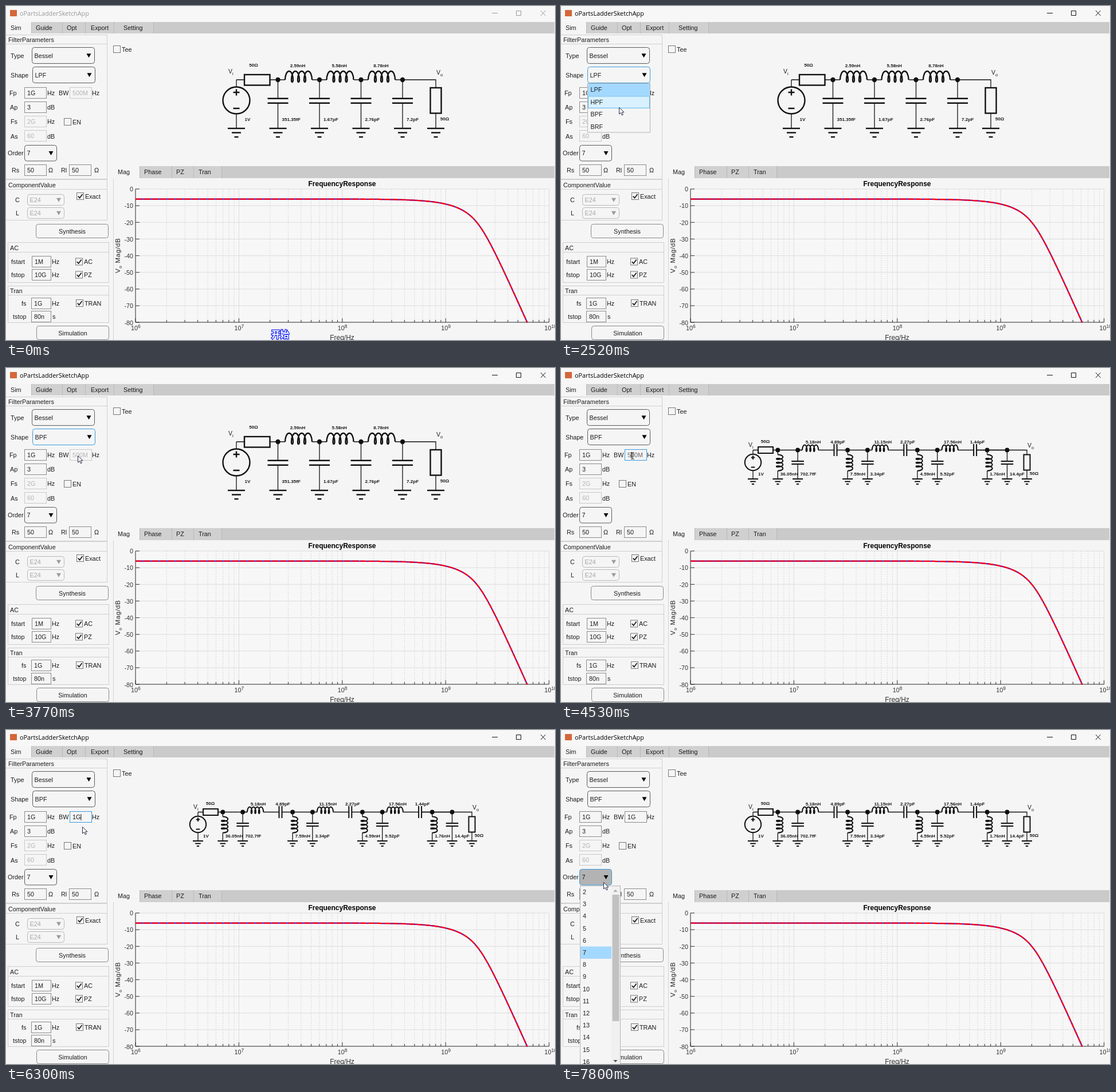
An HTML page that plays this animation: 958 px wide and 584 px high, repeating every 8 s.

```html
<!DOCTYPE html>
<html lang="en">
<head>
<meta charset="utf-8">
<title>Filter designer</title>
<style>
html, body { margin: 0; width: 100%; height: 100%; overflow: hidden; background: #f5f5f5; }
svg { display: block; width: 958px; height: 584px; }
text { font-family: "Liberation Sans", Arial, sans-serif; font-size: 10.8px; fill: #1c1c1c; white-space: pre; }
</style>
</head>
<body>
<svg id="stage" viewBox="0 0 958 584"></svg>
<script>
const LOOP = 8000;
const BG = '#f5f5f5', INK = '#1c1c1c', OFF = '#b4b4b4', BLUE = '#3a9bdc', PICK = '#a4d9ff';
const stage = document.getElementById('stage');

function el(parent, tag, attrs = {}, content) {
  const e = document.createElementNS('http://www.w3.org/2000/svg', tag);
  set(e, attrs);
  if (content !== undefined) e.textContent = content;
  parent.appendChild(e);
  return e;
}
function set(e, attrs) { for (const k in attrs) e.setAttribute(k, attrs[k]); }
function show(e, on) { e.setAttribute('visibility', on ? 'visible' : 'hidden'); }

const group = (parent = stage) => el(parent, 'g');
const label = (p, x, y, s, a = {}) => el(p, 'text', { x, y, ...a }, s);
const box = (p, x1, y1, x2, y2, a = {}) =>
  el(p, 'rect', { x: x1, y: y1, width: x2 - x1, height: y2 - y1, fill: 'none', ...a });
const path = (p, d, a = {}) => el(p, 'path', { d, fill: 'none', stroke: '#111', ...a });
const sub = (p, x, y, base, low, size) => {
  const t = label(p, x, y, base, { 'font-size': size, style: `font-size:${size}px` });
  el(t, 'tspan', { dy: 3, style: `font-size:${size * 0.72}px` }, low);
  return t;
};

// Widgets
function tabs(p, x, y, w, h, edges, names, xs) {
  box(p, x, y, x + w, y + h, { fill: '#cacaca' });
  box(p, x, y, edges[edges.length - 1], y + h, { fill: '#d0d0d0' });
  box(p, x, y, edges[0], y + h + 1, { fill: BG });
  edges.forEach(e => path(p, `M${e + .5} ${y}v${h}`, { stroke: '#b9b9b9' }));
  names.forEach((n, i) => label(p, xs[i], y + 14, n));
}
function field(p, x1, y1, x2, y2, s, off) {
  const r = box(p, x1 - .5, y1 - .5, x2 + .5, y2 + .5, { fill: BG, stroke: off ? '#c9c9c9' : '#8c8c8c' });
  const t = label(p, x1 + 4, (y1 + y2) / 2 + 4, s, { style: `fill:${off ? OFF : INK}` });
  return { r, t };
}
function combo(p, x1, y1, x2, y2, s, off) {
  const my = (y1 + y2) / 2, ax = x2 - (off ? 10 : 10.5);
  const r = box(p, x1 + .5, y1 + .5, x2 - .5, y2 - .5, { rx: 4, fill: BG, stroke: off ? '#b9b9b9' : '#5c5c5c' });
  const t = label(p, x1 + 4.5, my + 4, s, { style: `fill:${off ? '#a6a6a6' : INK}` });
  path(p, `M${ax - 4} ${my - 3.2}h8l-4 7z`, { fill: off ? '#9b9b9b' : '#000', stroke: 'none' });
  return { r, t };
}
function check(p, x, y, s, on) {
  box(p, x + .5, y + .5, x + 12.5, y + 12.5, { fill: BG, stroke: '#777' });
  if (on) path(p, `M${x + 2.8} ${y + 6.6}l2.8 3l5 -6.6`, { stroke: '#222', 'stroke-width': 1.8 });
  label(p, x + 15, y + 10.5, s);
}
function button(p, x1, y1, x2, y2, s) {
  box(p, x1 - .5, y1 - .5, x2 + .5, y2 + .5, { rx: 4, fill: BG, stroke: '#8a8a8a' });
  label(p, (x1 + x2) / 2, (y1 + y2) / 2 + 4, s, { 'text-anchor': 'middle' });
}
function panel(p, x1, y1, x2, y2, lineY, s) {
  box(p, x1 + .5, y1 + .5, x2 - .5, y2 - .5, { stroke: '#cfcfcf' });
  path(p, `M${x1} ${lineY + .5}H${x2}`, { stroke: '#cfcfcf' });
  label(p, Math.max(4, x1 + 4), lineY - 4 + .5, s);
}

// Title bar
const bar = group();
box(stage, 0, 0, 958, 28, { fill: '#f7f7f7' });
const title = label(stage, 24, 16.8, 'oPartsLadderSketchApp', {});
box(stage, 7, 7, 19, 18, { fill: '#d5673a' });
const winBtns = path(stage, 'M848 12.5h10M890.5 8.5h8v8h-8zM933 8l8.5 9M941.5 8l-8.5 9');
tabs(stage, 0, 28, 957, 20, [44, 98, 138, 188, 257],
  ['Sim', 'Guide', 'Opt', 'Export', 'Setting'], [8, 52, 106, 148, 205]);

// Left column
const side = group();
panel(side, -2, 50, 177, 303, 66, 'FilterParameters');
panel(side, -2, 303, 177, 375, 320, 'ComponentValue');
panel(side, 3, 413, 180, 484, 430, 'AC');
panel(side, 3, 489, 180, 554, 505, 'Tran');
[['Type', 8, 91], ['Shape', 8, 125], ['Fp', 6, 156], ['Hz', 72, 156], ['BW', 92, 156], ['Hz', 150, 156],
 ['Ap', 7, 181], ['dB', 72, 181], ['Fs', 8, 206], ['Hz', 72, 206], ['As', 8, 232], ['dB', 72, 232],
 ['Order', 3, 261], ['Rs', 10, 291], ['Ω', 74, 291], ['Rl', 96, 291], ['Ω', 154, 291],
 ['C', 16, 343], ['L', 17, 366], ['fstart', 9, 451], ['Hz', 80, 451], ['fstop', 9, 474], ['Hz', 80, 474],
 ['fs', 27, 524], ['Hz', 80, 524], ['tstop', 12, 547], ['s', 81, 547]
].forEach(([s, x, y]) => label(side, x, y, s));
combo(side, 45, 72, 155, 101, 'Bessel');
const shape = combo(side, 46, 106, 156, 135, 'LPF');
const order = combo(side, 32, 243, 89, 271.5, '7');
combo(side, 37, 329, 102, 349, 'E24', true);
combo(side, 37, 352, 102, 372, 'E24', true);
field(side, 33, 143, 70, 161, '1G');
const bw = field(side, 112, 143, 149, 161, '500M');
field(side, 33, 168, 70, 186, '3');
field(side, 33, 193, 70, 211, '2G', true);
field(side, 33, 218, 70, 236, '60', true);
field(side, 33, 278, 70, 296, '50');
field(side, 111, 278, 148, 296, '50');
field(side, 46, 438, 78, 456, '1M');
field(side, 46, 461, 78, 479, '10G');
field(side, 45, 511, 78, 529, '1G');
field(side, 45, 534, 78, 552, '80n');
const mark = box(side, 116, 145, 144, 159, { fill: PICK, 'fill-opacity': .6 });
const caret = path(side, 'M0 147v11', { stroke: '#111' });
check(side, 101, 196, 'EN');
check(side, 187, 69, 'Tee');
check(side, 123, 326, 'Exact', true);
check(side, 121, 440.5, 'AC', true);
check(side, 121, 463.5, 'PZ', true);
check(side, 122, 513, 'TRAN', true);
button(side, 53, 382, 178, 405, 'Synthesis');
button(side, 54, 560, 179, 583, 'Simulation');

// Schematics: every part is drawn at scale k
function schematic(k, y) {
  const g = group(), thick = { 'stroke-width': k < 1 ? 2 : 2.4 };
  const gy = k < 1 ? 194 : 214;
  const wire = d => path(g, d, { 'stroke-width': 1.3 });
  const coilPath = `M0 0${Array(4).fill('a7 15 0 0 1 14 0').join('a1.5 4 0 0 1 -3 0')}`;
  const part = {
    wire,
    text: (x, ty, s, anchor = 'middle') =>
      label(g, x, ty, s, { 'text-anchor': anchor, style: 'font-size:8.1px;font-weight:bold' }),
    dot: x => el(g, 'circle', { cx: x, cy: y, r: k < 1 ? 3.9 : 4.2, fill: '#111' }),
    coil: (x, cy, turn = 0) => path(g, coilPath,
      { transform: `translate(${x} ${cy}) rotate(${turn}) scale(${k})`, 'stroke-width': (k < 1 ? 2 : 2.4) / k }),
    ground: x => [15, 8, 3.5].forEach((w, i) =>
      path(g, `M${x - w * k} ${gy + i * 7.5 * k}h${2 * w * k}`, thick)),
    rect: (x1, y1, x2, y2) => box(g, x1, y1, x2, y2, { stroke: '#111', ...thick }),
    shuntC(x) {
      const cy = k < 1 ? 165.5 : 165.8, d = 4 * k;
      wire(`M${x} ${y}V${cy - d}M${x} ${cy + d}V${gy}`);
      path(g, `M${x - 18 * k} ${cy - d}h${36 * k}M${x - 18 * k} ${cy + d}h${36 * k}`, thick);
      part.ground(x);
    },
    source(x, cy, r) {
      wire(`M${x} ${y}V${cy - r}M${x} ${cy + r}V${gy}`);
      el(g, 'circle', { cx: x, cy, r, fill: 'none', stroke: '#111', ...thick });
      const h = 5.5 * k, m = 14 * k;
      path(g, `M${x - h} ${cy - m}h${2 * h}M${x} ${cy - m - h}v${2 * h}M${x - h} ${cy + m}h${2 * h}`, thick);
      part.ground(x);
    }
  };
  return { g, ...part };
}

const low = schematic(1, 129);
low.wire('M402 129H416M460 129H487M534 129H560M607 129H632M679 129H750V143M750 188V214');
low.source(402, 165, 23.5);
low.rect(416, 120, 460.5, 138.5);
low.rect(740.5, 143, 759.5, 187.5);
low.ground(750);
['351.35fF', '1.67pF', '2.76pF', '7.2pF'].forEach((s, i) => {
  const x = 474.5 + 72.5 * i;
  low.dot(x);
  low.shuntC(x);
  low.text(x + 7, 200.5, s, 'start');
});
['2.59nH', '5.58nH', '8.78nH'].forEach((s, i) => {
  low.coil(487 + 72.5 * i, 129);
  low.text(509 + 72.7 * i, 106.5, s);
});
low.text(432, 106, '50Ω');
low.text(421.5, 200.5, '1V');
low.text(765.5, 200, '50Ω');
sub(low.g, 388, 117.5, 'V', 'i', 10.5);
sub(low.g, 751, 119.5, 'V', 'o', 10.5);

const band = schematic(.6, 143.5);
band.wire('M335 143.5H344M370 143.5H421M813 151V143.5H725M813 179V194');
band.source(335, 165, 14.2);
band.rect(344, 138, 370, 149);
band.rect(807.5, 151.5, 818.5, 178.5);
band.ground(813);
[['36.05nH', '702.7fF'], ['7.59nH', '3.34pF'], ['4.59nH', '5.52pF'], ['1.76nH', '14.4pF']].forEach(([l, c], i) => {
  const x = 378.3 + 121.8 * i;
  band.dot(x);
  band.dot(x + 34.8);
  band.wire(`M${x} 143.5V151.5M${x} 179.5V194`);
  band.coil(x, 151.5, 90);
  band.ground(x);
  band.shuntC(x + 34.8);
  band.text(x + 4.5, 187.5, l, 'start');
  band.text(x + 39.3, 187.5, c, 'start');
});
[['5.18nH', '4.89pF'], ['11.15nH', '2.27pF'], ['17.56nH', '1.44pF']].forEach(([l, c], i) => {
  const x = 421 + 121.8 * i;
  band.wire(`M${x - 8} 143.5h8M${x + 28} 143.5h27.5M${x + 60.5} 143.5h53`);
  band.coil(x, 143.5);
  path(band.g, `M${x + 55.5} 133v21M${x + 60.5} 133v21`, { 'stroke-width': 2 });
  band.text(x + 19, 131.5, l);
  band.text(x + 62, 131.5, c);
});
band.text(356.5, 131, '50Ω');
band.text(349, 187.5, '1V');
band.text(825.5, 187, '50Ω');
sub(band.g, 327, 138, 'V', 'i', 10.5);
sub(band.g, 814, 139, 'V', 'o', 10.5);

// Plot
const plot = group();
tabs(plot, 187, 280, 770, 21, [233, 289, 327, 376], ['Mag', 'Phase', 'PZ', 'Tran'], [195, 241, 297, 336]);
path(plot, 'M187.5 301V584', { stroke: '#d4d4d4' });
const X0 = 226, DEC = 180.4, Y0 = 320, DB = 29.15 / 10, YB = 553;
box(plot, X0, Y0, X0 + 4 * DEC, YB, { fill: '#f7f7f7' });
label(plot, 586.5, 315, 'FrequencyResponse', { 'text-anchor': 'middle', style: 'font-size:12px;font-weight:bold;fill:#000' });
let minor = '', major = '', ticks = '';
for (let d = 0; d < 4; d++) {
  for (let m = 2; m < 10; m++) {
    const x = (X0 + DEC * (d + Math.log10(m))).toFixed(1);
    minor += `M${x} ${Y0}V${YB}`;
    ticks += `M${x} ${YB}v-4`;
  }
}
for (let i = 0; i <= 4; i++) {
  const x = X0 + DEC * i;
  major += `M${x} ${Y0}V${YB}`;
  ticks += `M${x} ${YB}v-7`;
  const t = label(plot, x - 8, 567, '10', { style: 'fill:#333' });
  el(t, 'tspan', { dy: -4, style: 'font-size:8.5px' }, 6 + i);
}
for (let i = 0; i <= 8; i++) {
  const y = Y0 + 10 * DB * i;
  major += `M${X0} ${y}H${X0 + 4 * DEC}`;
  ticks += `M${X0} ${y}h7`;
  label(plot, 222, y + 4.3, i ? `-${i * 10}` : '0', { 'text-anchor': 'end', style: 'fill:#333' });
}
path(plot, minor, { stroke: '#cdcdcd', 'stroke-dasharray': '1.5 2.5' });
path(plot, major, { stroke: '#dcdcdc' });
path(plot, ticks + `M${X0} ${Y0}V${YB}H${X0 + 4 * DEC}`, { stroke: '#333' });
label(plot, 586.5, 584, 'Freq/Hz', { 'text-anchor': 'middle', style: 'font-size:12px;fill:#333' });
const yName = el(plot, 'text', { transform: 'translate(199 467) rotate(-90)', style: 'font-size:11.5px;fill:#222;letter-spacing:.7px' }, 'V');
el(yName, 'tspan', { dy: 3, style: 'font-size:8px' }, 'o');
el(yName, 'tspan', { dy: -3 }, ' Mag/dB');

// Seventh-order Bessel low-pass with its -3 dB point at 1 GHz, between equal 50 ohm ends
function gainDb(f) {
  const w = 2.9517 * f / 1e9, c = [135135, 135135, 62370, 17325, 3150, 378, 28, 1];
  let re = 0, im = 0;
  c.forEach((a, n) => {
    const v = a * w ** n * (n % 4 < 2 ? 1 : -1);
    if (n % 2) im += v; else re += v;
  });
  return 20 * Math.log10(c[0] / Math.hypot(re, im)) - 6.02;
}
let curve = '';
for (let x = X0; x < X0 + 4 * DEC; x++) {
  const y = Y0 - DB * gainDb(10 ** (6 + (x - X0) / DEC));
  curve += `${curve ? 'L' : 'M'}${x} ${Math.min(y, YB).toFixed(2)}`;
  if (y > YB) break;
}
path(plot, curve, { stroke: '#2a1be0', 'stroke-width': 2.2 });
path(plot, curve, { stroke: '#fb0014', 'stroke-width': 2.3, 'stroke-dasharray': '12 2' });

// Pop-up lists
const shapes = group();
box(shapes, 46.5, 135.5, 155.5, 221, { fill: BG, stroke: '#b5b5b5' });
box(shapes, 47, 136, 155, 157, { fill: PICK });
const hover = box(shapes, 47.5, 0, 154.5, 20.5, { fill: '#d9f1ff', stroke: '#5ab4ee' });
['LPF', 'HPF', 'BPF', 'BRF'].forEach((s, i) => label(shapes, 51.5, 150.3 + 21.4 * i, s));

const orders = group();
box(orders, 33.5, 272.5, 103.5, 590, { fill: BG, stroke: '#b5b5b5' });
box(orders, 34, 378.5, 88, 400, { fill: PICK });
for (let n = 2; n <= 16; n++) label(orders, 38, 287 + 21.2 * (n - 2), n);
box(orders, 88, 273, 103, 584, { fill: '#f0f0f0' });
box(orders, 89.5, 288, 101.5, 509, { fill: '#c1c1c1' });
path(orders, 'M91.5 283h7l-3.5 -4z', { fill: '#a8a8a8', stroke: 'none' });
path(orders, 'M91.5 577h7l-3.5 4z', { fill: '#505050', stroke: 'none' });

const caption = label(stage, 478.5, 580, '开始', {
  'text-anchor': 'middle', 'paint-order': 'stroke',
  style: 'font-family:"Noto Sans CJK SC","Noto Sans CJK",sans-serif;font-size:15.5px;font-weight:bold;fill:#fff;stroke:#1322f5;stroke-width:2.4px'
});
const arrow = path(stage, 'M0 0V11.5L2.8 9L4.8 13.4L6.8 12.5L4.9 8.3H8.6Z', { fill: '#fff', stroke: '#2b2b45' });
const beam = path(stage, 'M122.5 147.5q2.5 0 2.5 1.5q0 -1.5 2.5 -1.5M125 149v9M122.5 159.5q2.5 0 2.5 -1.5q0 1.5 2.5 1.5', { stroke: '#222' });

// The screen refreshes only at these times
const refresh = [0, 500, 750, 1000, 1250, 1500, 1760, 2010, 2270, 2520, 2770, 3030, 3270, 3520, 3770, 4020,
  4530, 4770, 5020, 5280, 5530, 5780, 6050, 6300, 6550, 6800, 7050, 7300, 7550, 7800];
const route = [[750, 236, 212], [1500, 116, 119], [2010, 114, 122], [2520, 101, 177], [2770, 99, 189],
  [3270, 100, 189], [3770, 125, 153], [6050, 127, 158], [6300, 133, 169], [6550, 126, 178],
  [7050, 72, 228], [7300, 76, 252], [7800, 74, 266]];

function pointer(t) {
  let i = 0;
  while (i < route.length - 2 && t > route[i + 1][0]) i++;
  const [t1, x1, y1] = route[i], [t2, x2, y2] = route[i + 1];
  const u = Math.min(1, Math.max(0, (t - t1) / (t2 - t1))), e = u * u * (3 - 2 * u);
  return [x1 + (x2 - x1) * e, y1 + (y2 - y1) * e];
}

function draw(now) {
  const t = refresh.filter(s => s <= now).pop();
  const during = (a, b) => t >= a && t < b;

  const active = t >= 1760;
  title.style.cssText = `font-family:"Open Sans","Noto Sans",sans-serif;font-size:10.8px;fill:${active ? '#000' : '#9a9a9a'}`;
  winBtns.setAttribute('stroke', active ? '#111' : '#999');
  show(caption, t < 500);

  const [x, y] = pointer(t);
  const editing = during(4530, 7550), overText = during(4530, 6050);
  arrow.setAttribute('transform', `translate(${x + .5} ${y + .5})`);
  show(arrow, t >= 750 && !overText);
  show(beam, overText);

  show(shapes, during(2010, 3030));
  const row = Math.floor((y - 136) / 21.4);
  hover.setAttribute('y', 136.5 + 21.4 * row);
  show(hover, during(2010, 3030) && row > 0);
  shape.t.textContent = t < 3030 ? 'LPF' : 'BPF';
  shape.r.setAttribute('stroke', during(1760, 4530) ? BLUE : '#5c5c5c');

  show(low.g, t < 4020);
  show(band.g, t >= 4020);

  const typed = t < 5280 ? '500M' : '1G'.slice(0, t < 5530 ? 0 : t < 5780 ? 1 : 2);
  bw.t.textContent = typed;
  bw.t.style.fill = t < 4020 ? OFF : t < 4770 ? '#666' : INK;
  bw.r.setAttribute('stroke', editing ? BLUE : t < 4020 ? '#c9c9c9' : '#8c8c8c');
  show(mark, during(5020, 5280));
  const head = t < 5020 ? '5' : typed;
  const wide = [...head].reduce((w, c) => w + (c === 'G' ? 8.4 : 6), 0);
  caret.setAttribute('transform', `translate(${116.5 + wide} 0)`);
  show(caret, editing && !during(5020, 5280));

  const open = t >= 7550;
  show(orders, open);
  set(order.r, { fill: open ? '#b3b3b3' : BG, stroke: open ? BLUE : '#5c5c5c' });
}

function tick() {
  draw(performance.now() % LOOP);
  requestAnimationFrame(tick);
}
tick();
</script>
</body>
</html>
```
